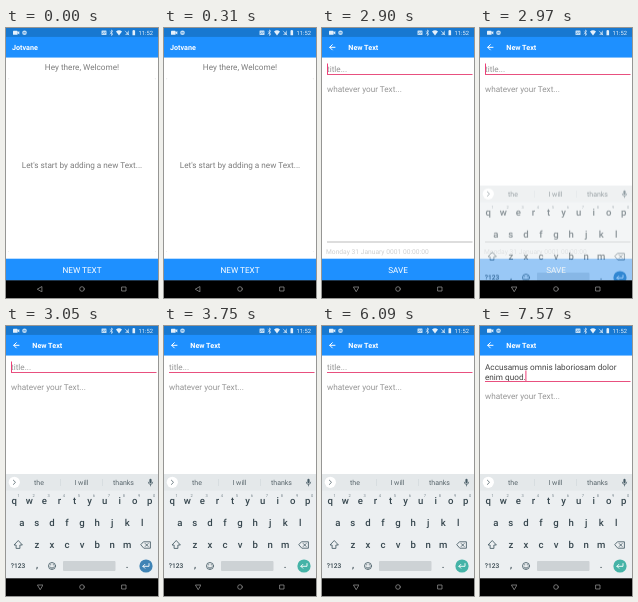
An HTML page for the animation above (8 s loop, 152 by 270 pixels).

```html
<!DOCTYPE html>
<html lang="en">
<head>
<meta charset="utf-8">
<title>Notes app</title>
<style>
html, body { margin: 0; width: 100%; height: 100%; overflow: hidden; background: #fff; }
svg { display: block; width: 100vw; height: 100vh; font-family: Roboto, sans-serif; text-rendering: geometricPrecision; }
text { font-size: 8.2px; }
.mid { text-anchor: middle; }
.bar { fill: #fff; font-size: 7.2px; font-weight: 700; }
.soft { fill: #7c7c7c; }
.hint { fill: #959595; }
.btn { fill: #fff; text-anchor: middle; }
.key { fill: #37474f; text-anchor: middle; font-size: 9.6px; font-weight: 500; }
.num { fill: #78868d; text-anchor: middle; font-size: 4px; }
.word { fill: #59666c; text-anchor: middle; font-size: 7px; }
.line { fill: none; stroke-linecap: round; stroke-linejoin: round; }
.card { filter: drop-shadow(0 .6px .7px rgba(0, 0, 0, .28)); }
</style>
</head>
<body>
<svg viewBox="0 0 152 270" preserveAspectRatio="none">
  <rect width="152" height="270" fill="#fff"/>

  <g id="home">
    <text class="soft mid" x="76" y="42">Hey there, Welcome!</text>
    <rect class="card" x="2" y="50" width="148" height="174" rx="1.5" fill="#fff"/>
    <text class="soft mid" x="76" y="140">Let's start by adding a new Text...</text>
    <rect y="230.7" width="152" height="22" fill="#1e90ff"/>
    <text class="btn" x="76" y="244.8">NEW TEXT</text>
  </g>

  <g id="editor">
    <rect y="29" width="152" height="224" fill="#fff"/>
    <text id="titleHint" class="hint" x="5" y="43.8">title...</text>
    <g id="titleText" fill="#444">
      <text x="5" y="43.8">Accusamus omnis laboriosam dolor</text>
      <text x="5" y="53.5">enim quod.</text>
    </g>
    <g id="below">
      <path d="M5 46.5H150.5" stroke="#e8507f"/>
      <text class="hint" x="5" y="64.1">whatever your Text...</text>
    </g>
    <path id="caret" d="M5.5 35.5V46" stroke="#ee3f78"/>
    <path d="M5 214H150.5" stroke="#aaa" stroke-width=".8"/>
    <text x="4" y="226.3" fill="#cfcfcf" style="font-size:6.7px">Monday 31 January 0001 00:00:00</text>
    <rect y="230.7" width="152" height="22" fill="#1e90ff"/>
    <text class="btn" x="76" y="244.8">SAVE</text>
  </g>

  <g id="keyboard">
    <rect y="148" width="152" height="105" fill="#eceff1"/>
    <rect y="148" width="152" height="16.5" fill="#e4e8ea"/>
    <circle cx="8.3" cy="156.3" r="5.6" fill="#fff"/>
    <path class="line" d="M7.4 154.2l2.1 2.1-2.1 2.1" stroke="#607078" stroke-width=".9"/>
    <path d="M54.5 153v7M96.5 153v7" stroke="#cfd5d8" stroke-width=".6"/>
    <text class="word" x="33" y="158.6">the</text>
    <text class="word" x="75.5" y="158.6">I will</text>
    <text class="word" x="117.5" y="158.6">thanks</text>
    <rect x="143.4" y="152.8" width="2.2" height="4.6" rx="1.1" fill="#455a64"/>
    <path class="line" d="M142.3 156.2a2.2 2.2 0 0 0 4.4 0M144.5 158.5v1.4" stroke="#455a64" stroke-width=".7"/>
    <g id="keys"></g>
    <g class="line" stroke="#455a64" stroke-width=".85">
      <path d="M12 214.8l-4 4.2h2.1v3.4h3.8V219H16z"/>
      <path d="M137.8 215.8h6.6v6.4h-6.6l-2.8-3.2zM139.3 217.6l2.8 2.8m0-2.8l-2.8 2.8"/>
      <circle cx="46" cy="240" r="3.5"/>
      <path d="M44.2 241a2 2 0 0 0 3.6 0M44.7 238.7v.2M47.3 238.7v.2"/>
    </g>
    <rect x="57" y="235" width="52.5" height="10" rx="1" fill="#cdd2d5"/>
    <circle id="enter" cx="140" cy="240" r="6.6" fill="#45b3a7"/>
    <path class="line" d="M143 237.6v2.7h-6m1.8-1.9l-1.9 1.9 1.9 1.9" stroke="#fff" stroke-width=".9"/>
  </g>

  <rect width="152" height="29.55" fill="#1e90ff"/>
  <rect width="152" height="8.9" fill="#1878d0"/>
  <g fill="#e4f0fb">
    <rect x="7" y="2.8" width="4.6" height="4" rx=".6"/>
    <path d="M11.3 4.5l2-1.4v3.4l-2-1.4z"/>
    <circle cx="18.5" cy="4.8" r="2.3" fill="#c4def5"/>
    <path d="M17.3 4.8h2.4" stroke="#1878d0" stroke-width=".7"/>
    <rect x="95.5" y="2.6" width="5" height="4.4" rx=".5" fill="#c4def5"/>
    <path d="M96.5 5.8l1.1-1.4 1 .9 1-1.2" class="line" stroke="#1878d0" stroke-width=".5"/>
    <path d="M104 3.5l3 2.7-1.5 1.3V2l1.5 1.3-3 2.7" class="line" stroke="#e4f0fb" stroke-width=".6"/>
    <path d="M110 3.4q3-2.2 6 0l-3 4z"/>
    <path d="M119 7h4V2.3z" fill="#8dbde8"/>
    <path d="M119 2.8l4 4.4" stroke="#e4f0fb" stroke-width=".6"/>
    <path d="M126.5 2.5h.7V2h1.2v.5h.7v4.8h-2.6z"/>
    <text x="132.5" y="7" style="font-size:5.8px">11:52</text>
  </g>
  <text id="homeTitle" class="bar" x="6" y="22.2">Jotvane</text>
  <g id="newTitle">
    <path class="line" d="M13 19.3H7.8m2.5-2.6l-2.6 2.6 2.6 2.6" stroke="#fff" stroke-width="1"/>
    <text class="bar" x="26.3" y="22.2">New Text</text>
  </g>

  <rect y="252.3" width="152" height="17.7" fill="#000"/>
  <g class="line" stroke="#8c8c8c" stroke-width=".8">
    <path id="navBack" d="M31.6 261l4.3-2.5v5z"/>
    <path id="navDown" d="M34 263.4l-2.6-4.4h5.2z"/>
    <circle cx="76" cy="261" r="2.3"/>
    <rect x="116" y="259" width="4" height="4"/>
  </g>
</svg>
<script>
const LOOP = 8000;
const $ = id => document.getElementById(id);

const keys = $('keys');
function key(label, x, y, cls = 'key', size) {
  const t = document.createElementNS('http://www.w3.org/2000/svg', 'text');
  t.setAttribute('class', cls);
  t.setAttribute('x', x);
  t.setAttribute('y', y);
  if (size) t.style.fontSize = size + 'px';
  t.textContent = label;
  keys.append(t);
}
function row(letters, x0, y) {
  [...letters].forEach((c, i) => key(c, x0 + i * 15.05, y));
}
row('qwertyuiop', 8.3, 178.3);
row('asdfghjkl', 15.8, 200.2);
row('zxcvbnm', 30.9, 222.2);
[...'1234567890'].forEach((d, i) => key(d, 12.6 + i * 15.05, 170.6, 'num'));
key('?123', 12, 242.4, 'key', 6.6);
key(',', 31, 242.4);
key('.', 121, 242.4);

// Steps are [time, value, easing]; without an easing the value holds.
const start = document.timeline.currentTime ?? 0;
function play(id, prop, steps) {
  const frames = steps.map(([t, v, easing = 'step-end']) =>
    ({ offset: t / LOOP, [prop]: v, easing }));
  frames.push({ offset: 1, [prop]: steps.at(-1)[1] });
  $(id).animate(frames, { duration: LOOP, iterations: Infinity }).startTime = start;
}
const show = (id, ...steps) => play(id, 'opacity', steps);

show('homeTitle', [0, 1], [1410, 0]);
show('newTitle', [0, 0], [1410, 1]);

show('editor', [0, 0], [2630, 0, 'ease-out'], [2840, 1]);
play('editor', 'transform', [
  [0, 'translateY(14px)'], [2630, 'translateY(14px)', 'ease-out'], [2840, 'translateY(0px)']
]);
show('navBack', [0, 1], [2830, 0]);
show('navDown', [0, 0], [2830, 1]);

show('keyboard', [0, 0], [2920, 0, 'ease-out'], [3040, 1]);
play('keyboard', 'transform', [
  [0, 'translateY(24px)'], [2920, 'translateY(24px)', 'ease-out'], [3040, 'translateY(0px)']
]);
play('enter', 'fill', [[0, '#3f83b5'], [3110, '#3f83b5', 'linear'], [3230, '#45b3a7']]);

show('caret', [0, 1], [3750, 0], [4250, 1], [4740, 0], [5740, 1], [6090, 0],
  [6760, 1], [7090, 0], [7190, 1]);
play('caret', 'transform', [[0, 'translate(0px, 0px)'], [7570, 'translate(40.4px, 9px)']]);
show('titleHint', [0, 1], [7570, 0]);
show('titleText', [0, 0], [7570, 1]);
play('below', 'transform', [[0, 'translateY(0px)'], [7570, 'translateY(9px)']]);
</script>
</body>
</html>
```
